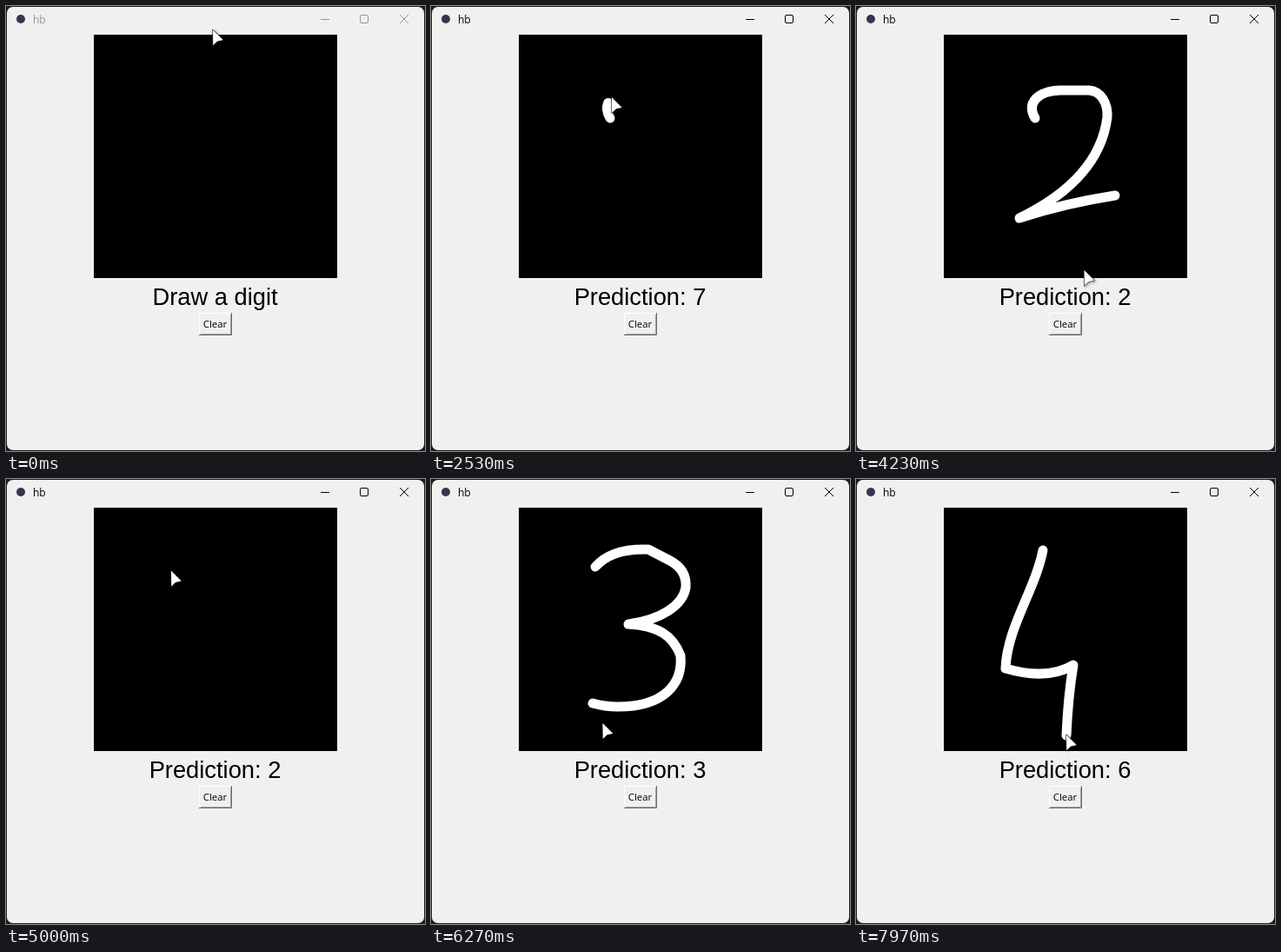
Write an HTML page with a canvas that moves like this. It is 482x512 px and loops after 8000 ms.

```html
<!DOCTYPE html>
<html lang="en">
<head>
<meta charset="utf-8">
<title>Digit pad</title>
<style>
  html, body { margin: 0; width: 100%; height: 100%; overflow: hidden; background: #1c1c1a; }
  canvas { display: block; width: 482px; height: 512px; }
</style>
</head>
<body>
<canvas id="stage" width="482" height="512"></canvas>
<script>
const ctx = document.getElementById('stage').getContext('2d');
const LOOP = 8000;
const FACE = '#f0f0ef', INK = '#fff';
const HOME = { x: 238, y: 28 }, BUTTON = { x: 238, y: 365 };
const TRAVEL = 430;   // ms for a move between pad and button
const LEAD = 20;      // ms the pointer runs ahead of the ink
const PRESS = 80;     // ms the button stays down

// One handwritten digit, drawn at constant speed and removed at the clear time
function digit(begin, end, clear, d) {
  const curve = document.createElementNS('http://www.w3.org/2000/svg', 'path');
  curve.setAttribute('d', d);
  const length = curve.getTotalLength();
  const drawn = t => length * Math.max(0, Math.min(1, (t - begin) / (end - begin)));
  const point = t => curve.getPointAtLength(drawn(t));
  return { begin, end, clear, shape: new Path2D(d), drawn, point };
}

const digits = [
  digit(860, 1230, 1950, 'M238 90 Q238 162 248 234'),
  digit(2480, 3600, 4500, 'M206 129 C196 112 208 98 235 97 L268 97 C282 98 290 112 289 128 ' +
    'C283 175 250 214 188 244 Q240 227 298 218'),
  digit(5040, 6130, 6650, 'M189 101 C203 85 225 80 250 81 L275 94 C290 102 294 113 293 125 ' +
    'C290 145 265 162 227 167 C262 169 278 180 287 203 C290 236 268 262 215 262 Q200 262 186 258'),
  digit(7160, 7970, Infinity, 'M215 82 C206 128 174 170 172 218 Q220 232 250 214 Q244 250 242 295')
];

const labels = [
  [0, 'Draw a digit'], [890, 'Prediction: 1'], [2500, 'Prediction: 7'],
  [3500, 'Prediction: 2'], [5640, 'Prediction: 3'], [7450, 'Prediction: 6']
];

// Eased move from a to b
function glide(a, b, t, from, to) {
  const k = Math.max(0, Math.min(1, (t - from) / (to - from)));
  const e = k * k * (3 - 2 * k);
  return { x: a.x + (b.x - a.x) * e, y: a.y + (b.y - a.y) * e };
}

function pointer(t) {
  const i = digits.findIndex(g => t < g.clear + PRESS);
  const g = digits[i], first = g.point(g.begin), last = g.point(g.end);
  if (t < g.begin) {
    return i ? glide(BUTTON, first, t, digits[i - 1].clear + PRESS, g.begin)
             : glide(HOME, first, t, 0, g.begin);
  }
  if (t < g.end || g.clear === Infinity) return g.point(t + LEAD);
  const arrive = g.clear - PRESS;
  return glide(last, BUTTON, t, Math.max(g.end, arrive - TRAVEL), arrive);
}

function line(color, ...pts) {
  ctx.strokeStyle = color;
  ctx.lineWidth = 1;
  ctx.beginPath();
  pts.forEach(p => ctx.lineTo(...p));
  ctx.stroke();
}

function text(str, x, y, font, color, align = 'left') {
  ctx.font = font;
  ctx.fillStyle = color;
  ctx.textAlign = align;
  ctx.fillText(str, x, y);
}

function drawWindow(active) {
  ctx.fillStyle = '#1c1c1a';
  ctx.fillRect(0, 0, 482, 512);
  ctx.fillStyle = FACE;
  ctx.beginPath();
  ctx.roundRect(1, 1, 480, 510, 7);
  ctx.fill();

  ctx.fillStyle = '#30384a';
  ctx.beginPath();
  ctx.arc(17, 15, 5, 0, Math.PI * 2);
  ctx.fill();

  const color = active ? '#000' : '#969696';
  text('hb', 31, 20, '12px "Open Sans", sans-serif', color);
  line(color, [362, 15.5], [372, 15.5]);
  ctx.beginPath();
  ctx.roundRect(407.5, 10.5, 9, 9, 1.5);
  ctx.stroke();
  line(color, [453, 10], [463, 20]);
  line(color, [463, 10], [453, 20]);

  ctx.fillStyle = '#000';
  ctx.fillRect(101, 33, 280, 280);
}

function drawButton(pressed) {
  const light = '#fff', dark = '#696969';
  const [lit, shade] = pressed ? [dark, light] : [light, dark];
  const shift = pressed ? 1 : 0;
  line(lit, [222.5, 378], [222.5, 353.5], [259, 353.5]);
  line(pressed ? FACE : '#a0a0a0', [224, 377.5], [258.5, 377.5], [258.5, 355]);
  line(shade, [222, 378.5], [259.5, 378.5], [259.5, 353]);
  text('Clear', 240.5 + shift, 370 + shift, '11.4px "Open Sans", sans-serif', '#000', 'center');
}

function drawDigit(g, t) {
  if (t < g.begin || t >= g.clear) return;
  ctx.save();
  ctx.lineCap = ctx.lineJoin = 'round';
  ctx.lineWidth = 11;
  ctx.strokeStyle = INK;
  ctx.setLineDash([g.drawn(t) + 0.01, LOOP]);
  ctx.stroke(g.shape);
  ctx.restore();
}

function drawPointer({ x, y }) {
  ctx.save();
  ctx.translate(x, y - 1);
  ctx.beginPath();
  [[0, 0.5], [0.3, 18], [5, 13.5], [11.5, 12]].forEach(p => ctx.lineTo(...p));
  ctx.closePath();
  ctx.shadowColor = 'rgba(0, 0, 0, 0.5)';
  ctx.shadowBlur = 3;
  ctx.shadowOffsetX = ctx.shadowOffsetY = 1;
  ctx.lineJoin = 'round';
  ctx.lineWidth = 1.4;
  ctx.strokeStyle = '#333';
  ctx.stroke();
  ctx.shadowColor = 'transparent';
  ctx.fillStyle = '#fff';
  ctx.fill();
  ctx.restore();
}

function draw(t) {
  drawWindow(t >= 810);
  digits.forEach(g => drawDigit(g, t));
  const label = labels.filter(l => l[0] <= t).pop()[1];
  text(label, 240.5, 344, '27.3px "Liberation Sans", Arial, sans-serif', '#000', 'center');
  drawButton(digits.some(g => t >= g.clear - PRESS && t < g.clear));
  drawPointer(pointer(t));
}

const start = performance.now();
function tick() {
  draw((performance.now() - start) % LOOP);
  requestAnimationFrame(tick);
}
tick();
</script>
</body>
</html>
```
